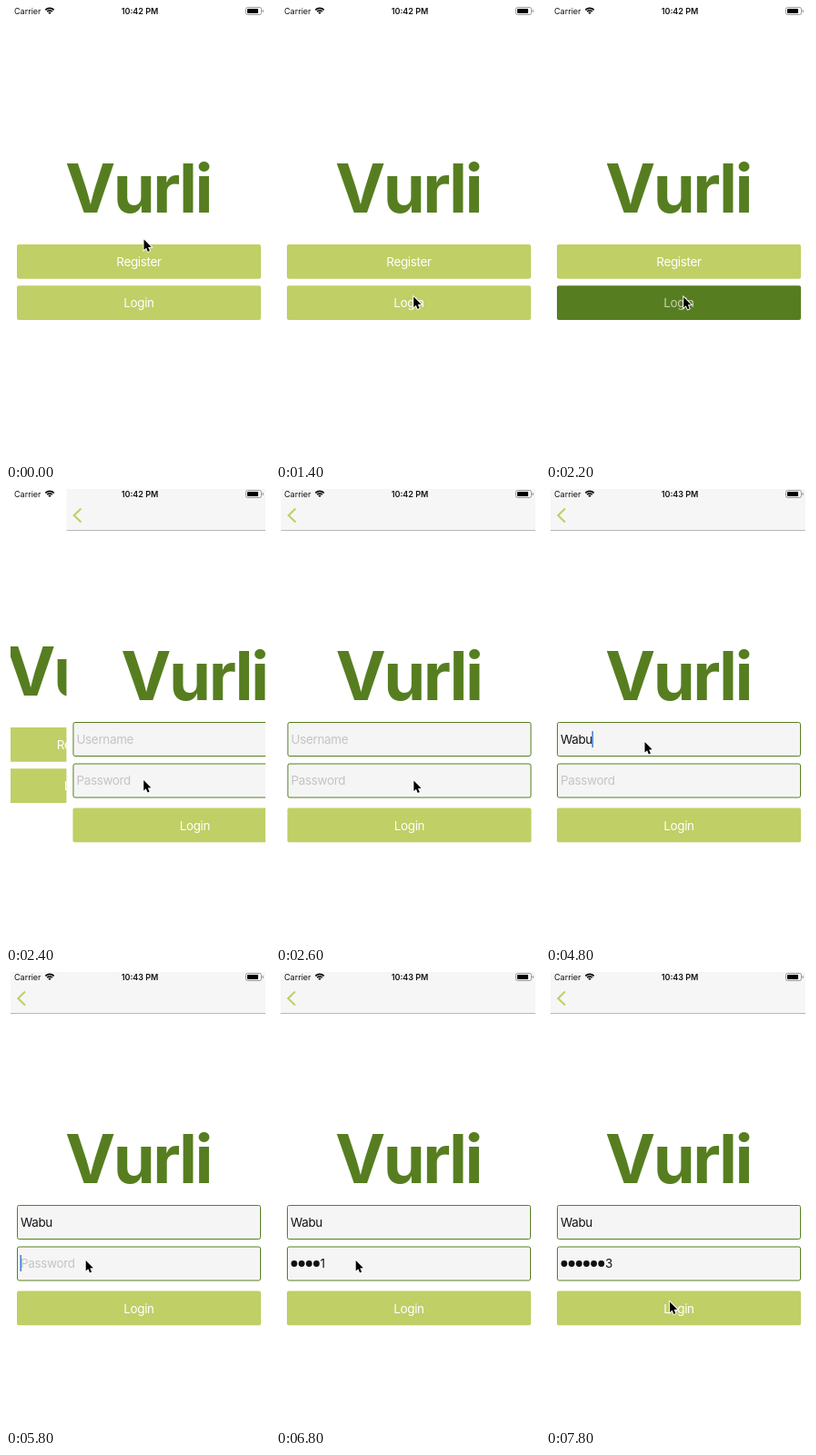
An HTML page with a canvas for the animation above (8000 ms loop, 290 by 500 pixels).

```html
<!DOCTYPE html>
<html lang="en">
<head>
<meta charset="utf-8">
<title>Login flow</title>
<style>
  html, body { margin: 0; width: 100%; height: 100%; overflow: hidden; background: #fff; }
  canvas { display: block; width: 290px; height: 500px; }
</style>
</head>
<body>
<canvas id="stage"></canvas>
<script>
const W = 290, H = 500, LOOP = 8000, STEP = 200;
const LEFT = 5, SCREEN = 280, MID = 146;
const DARK = '#567e20', LIGHT = '#c0cf66';
const FONT = 'Inter, "Liberation Sans", sans-serif';
const NAME = 'Wabu', PASS = 'wabu123';

const canvas = document.getElementById('stage');
const ctx = canvas.getContext('2d');
const ratio = window.devicePixelRatio || 1;
canvas.width = W * ratio;
canvas.height = H * ratio;

const clamp = (v, lo, hi) => Math.max(lo, Math.min(hi, v));
const ease = p => p * p * (3 - 2 * p);

// Pointer stops: time, x, y
const stops = [
  [0, 151.5, 256.5], [200, 151.5, 256.5], [1000, 151.2, 319.5],
  [2400, 151.2, 320], [2800, 151.5, 321], [3400, 108.5, 278],
  [4800, 108.5, 278], [5400, 87.7, 317], [7200, 87.7, 317],
  [7600, 136, 362.5], [8000, 136, 362.5]
];

function pointerAt(t) {
  const i = stops.findIndex(s => s[0] > t);
  const a = stops[i - 1], b = stops[i];
  const p = ease((t - a[0]) / (b[0] - a[0]));
  return [a[1] + (b[1] - a[1]) * p, a[2] + (b[2] - a[2]) * p];
}

function typed(t, start, gap, length) {
  return t < start ? 0 : clamp(Math.floor((t - start) / gap) + 1, 0, length);
}

// Critically damped push: 0 is the first page, 1 the second
function pushAt(t) {
  const x = Math.max(0, t - 2300) * 0.0287;
  return 1 - (1 + x) * Math.exp(-x);
}

function text(str, x, y, size, color, { weight = 400, align = 'left', space = 0 } = {}) {
  ctx.font = `${weight} ${size}px ${FONT}`;
  ctx.letterSpacing = space + 'px';
  ctx.textAlign = align;
  ctx.fillStyle = color;
  ctx.fillText(str, x, y);
  return ctx.measureText(str).width;
}

const label = (str, x, midY, color, align) =>
  text(str, x, midY + 4.8, 13.4, color, { align, space: -0.3 });

function roundBox(x, y, w, h, r, fill, stroke) {
  ctx.beginPath();
  ctx.roundRect(x, y, w, h, r);
  if (fill) { ctx.fillStyle = fill; ctx.fill(); }
  if (stroke) { ctx.strokeStyle = stroke; ctx.lineWidth = 1; ctx.stroke(); }
}

function heading(baseline) {
  text('Vurli', MID - 1, baseline, 74, DARK, { weight: 700, align: 'center', space: -2.5 });
}

function button(str, y, fill = LIGHT, color = '#fff') {
  roundBox(12, y, 268, 37.7, 2, fill);
  label(str, MID, y + 19.3, color, 'center');
}

function field(y, hint, empty) {
  roundBox(12.5, y + 0.5, 267, 37, 2, '#f5f5f5', DARK);
  if (empty) label(hint, 16, y + 19, '#c4c4c6');
}

function caret(x, midY, since) {
  if (since % 1000 >= 600) return;
  ctx.fillStyle = '#3f7fd0';
  ctx.fillRect(x, midY - 9, 1.5, 18);
}

function welcome(t) {
  const down = t >= 1800 && t < 2300;
  heading(226.5);
  button('Register', 262);
  button('Login', 307.2, down ? DARK : LIGHT, down ? '#c6d2b2' : '#fff');
}

function passwordText(t, count) {
  const dots = count > 0 ? count - 1 : 0;
  ctx.fillStyle = '#111';
  for (let i = 0; i < dots; i++) {
    ctx.beginPath();
    ctx.arc(20 + i * 8.15, 320.5, 3.4, 0, Math.PI * 2);
    ctx.fill();
  }
  const x = 16 + dots * 8.15;
  return x + label(PASS.slice(dots, count), x, 320.5, '#111');
}

function login(t) {
  ctx.fillStyle = '#fff';
  ctx.fillRect(LEFT, 0, SCREEN, H);
  ctx.fillStyle = '#f6f6f6';
  ctx.fillRect(LEFT, 0, SCREEN, 45);
  ctx.fillStyle = '#b9b9b9';
  ctx.fillRect(LEFT, 45, SCREEN, 1);

  ctx.beginPath();
  ctx.moveTo(21, 21.5);
  ctx.lineTo(13.3, 29);
  ctx.lineTo(21, 36.5);
  ctx.strokeStyle = LIGHT;
  ctx.lineWidth = 2.1;
  ctx.stroke();

  heading(231.5);
  const nameCount = typed(t, 4200, 150, NAME.length);
  const passCount = typed(t, 6200, 150, PASS.length);
  field(256, 'Username', !nameCount);
  field(301.5, 'Password', !passCount);

  const nameEnd = 16 + label(NAME.slice(0, nameCount), 16, 275, '#111');
  const passEnd = passwordText(t, passCount);
  const lastKey = [3600, 4200, 4800, 5600, 6200, 7200].filter(k => k <= t).pop();
  if (t >= 5600) caret(passEnd - 0.5, 320, t - lastKey);
  else if (t >= 3600) caret(nameEnd - 0.5, 275, t - lastKey);

  button('Login', 350.5);
}

function wifi(x, y) {
  ctx.strokeStyle = '#000';
  ctx.lineWidth = 1.6;
  for (const r of [4, 6.6]) {
    ctx.beginPath();
    ctx.arc(x, y, r, -Math.PI * 0.75, -Math.PI * 0.25);
    ctx.stroke();
  }
  ctx.beginPath();
  ctx.moveTo(x, y);
  ctx.arc(x, y, 2.4, -Math.PI * 0.75, -Math.PI * 0.25);
  ctx.fillStyle = '#000';
  ctx.fill();
}

function statusBar(t) {
  text('Carrier', 9, 9, 9, '#111');
  wifi(48, 9);
  text(t < 4600 ? '10:42 PM' : '10:43 PM', 147, 9, 9, '#111', { weight: 600, align: 'center' });
  roundBox(263.5, 1.5, 17, 8, 2, null, '#999');
  roundBox(265, 3, 12, 5, 0.8, '#000');
  roundBox(281.6, 4, 1.2, 3, 0.6, '#999');
}

function pointer([x, y]) {
  ctx.save();
  ctx.translate(x, y);
  ctx.beginPath();
  [[0, 0], [0, 11.6], [2.6, 9.2], [4.4, 13.4], [6.4, 12.5], [4.6, 8.4], [8.2, 8.2]]
    .forEach(([px, py]) => ctx.lineTo(px, py));
  ctx.closePath();
  ctx.strokeStyle = '#fff';
  ctx.lineWidth = 1.8;
  ctx.stroke();
  ctx.fillStyle = '#000';
  ctx.fill();
  ctx.restore();
}

function page(shift, paint, t) {
  ctx.save();
  ctx.beginPath();
  ctx.rect(LEFT, 0, SCREEN, H);
  ctx.clip();
  ctx.translate(shift, 0);
  paint(t);
  ctx.restore();
}

function draw(t) {
  ctx.setTransform(ratio, 0, 0, ratio, 0, 0);
  ctx.fillStyle = '#fff';
  ctx.fillRect(0, 0, W, H);
  const p = pushAt(t);
  if (p < 0.99) page(-0.3 * SCREEN * p, welcome, t);
  if (p > 0) page(SCREEN * (1 - p), login, t);
  statusBar(t);
  pointer(pointerAt(t));
}

const begin = performance.now();
function tick() {
  const t = (performance.now() - begin) % LOOP;
  draw(Math.floor(t / STEP) * STEP);
  requestAnimationFrame(tick);
}
tick();
</script>
</body>
</html>
```
